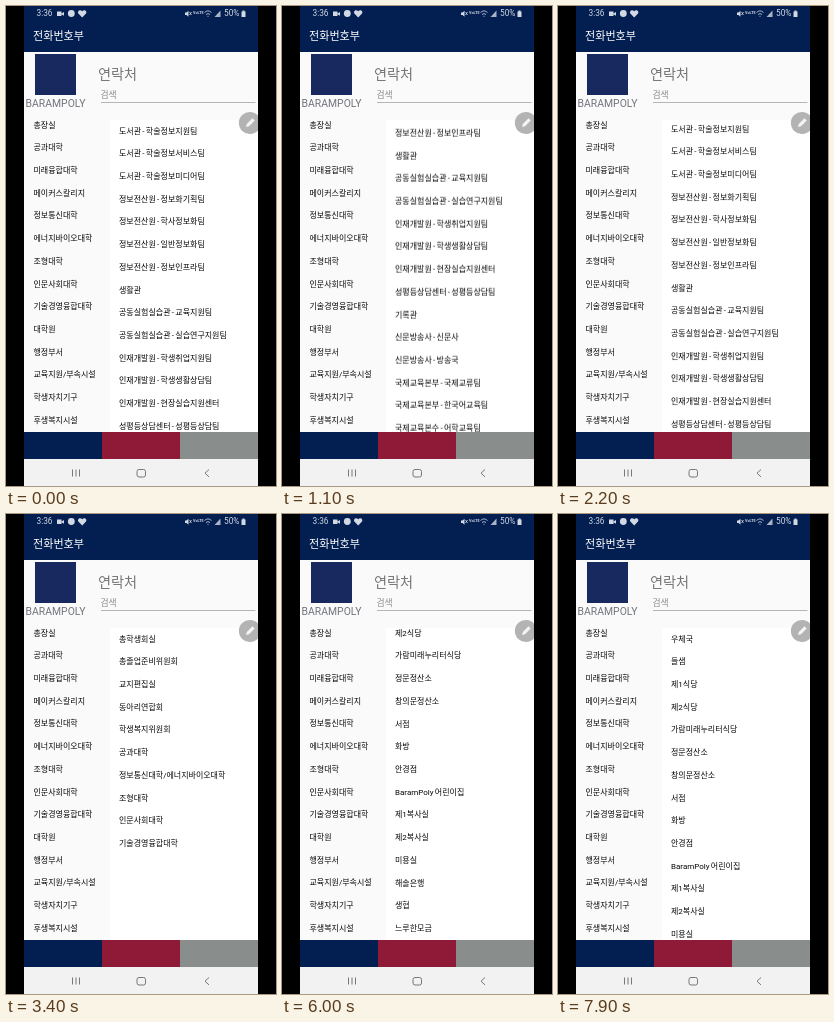
Animation of 270 by 480 pixels, one loop 8000 ms. Source, as an HTML page:

```html
<!DOCTYPE html>
<html lang="ko">
<head>
<meta charset="utf-8">
<title>전화번호부</title>
<style>
  html, body { margin: 0; width: 100%; height: 100%; overflow: hidden; background: #000; }
  body { font: 8px "Noto Sans CJK KR", "Noto Sans CJK", sans-serif; color: #080808; }
  #stage { position: relative; width: 270px; height: 480px; overflow: hidden; background: #000; }
  #screen { position: absolute; left: 18px; width: 234px; height: 480px; background: #fafafa; overflow: hidden; }
  svg { position: absolute; left: 0; top: 0; }
  .label { position: absolute; line-height: 20px; white-space: nowrap; }
  .bar { position: absolute; top: 0; width: 234px; height: 45.5px; background: #031e51; }
  .status { top: -.6px; color: #d3d9e4; font: 8.3px/16px Roboto, sans-serif; }
  .rows { font-family: Roboto, "Noto Sans CJK KR", "Noto Sans CJK", sans-serif; word-spacing: -.7px; }
  .rows div { height: 22.72px; line-height: 22.72px; white-space: nowrap; }
  #groups { position: absolute; left: 9.5px; top: 108.5px; }
  #pane { position: absolute; left: 86px; top: 114px; width: 148px; height: 312px; background: #fff; overflow: hidden; }
  #pane .rows { position: absolute; left: 9px; top: .5px; visibility: hidden; }
  #pane #support { animation: showSupport 8s step-end infinite, scrollSupport 8s linear infinite; }
  #pane #students { animation: showStudents 8s step-end infinite; }
  #pane #welfare { animation: showWelfare 8s step-end infinite, scrollWelfare 8s linear infinite; }
  @keyframes showSupport {
    0% { visibility: visible; }
    31.25%, 100% { visibility: hidden; }
  }
  @keyframes showStudents {
    0% { visibility: hidden; }
    31.25% { visibility: visible; }
    46.25%, 100% { visibility: hidden; }
  }
  @keyframes showWelfare {
    0% { visibility: hidden; }
    46.25%, 100% { visibility: visible; }
  }
  @keyframes scrollSupport {
    0% { transform: translateY(0); animation-timing-function: ease-in-out; }
    10% { transform: translateY(-142.4px); }
    12.5% { transform: translateY(-142.4px); animation-timing-function: ease-in; }
    13.75% { transform: translateY(-134.3px); animation-timing-function: ease-in-out; }
    23.75%, 27.5% { transform: translateY(-2px); }
    28.75%, 100% { transform: translateY(0); }
  }
  @keyframes scrollWelfare {
    0%, 51.25% { transform: translateY(0); animation-timing-function: ease-in; }
    57.5% { transform: translateY(-45.4px); animation-timing-function: ease-out; }
    62.5% { transform: translateY(-74.2px); }
    75% { transform: translateY(-73.6px); animation-timing-function: ease-in-out; }
    78.75%, 100% { transform: translateY(0); }
  }
  .tabs { position: absolute; top: 426px; width: 234px; height: 27px;
    background: linear-gradient(90deg, #031e51 78px, #8f1a38 78px 156px, #898d8c 156px); }
  .nav { position: absolute; top: 453px; width: 234px; height: 27px; background: #f2f2f2; }
</style>
</head>
<body>
<div id="stage">
  <div id="screen">
    <div class="bar"></div>
    <div class="label status" style="left:12.5px">3:36</div>
    <div class="label status" style="left:200px">50%</div>
    <div class="label status" style="left:169px;font-size:3.8px;font-weight:700">VoLTE</div>
    <div class="label" style="left:9px;top:19.3px;font-size:11.1px;font-weight:500;color:#fff">전화번호부</div>
    <div class="label" style="left:74px;top:57.3px;font-size:14.2px;color:#757575">연락처</div>
    <div class="label" style="left:76.5px;top:79px;font-size:8.8px;color:#8a8a8a">검색</div>
    <div class="label" style="left:0;top:87.5px;width:63px;text-align:center;font:10.4px/20px Roboto,sans-serif;color:#70747b">BARAMPOLY</div>
    <div id="groups" class="rows"></div>
    <div id="pane">
      <div id="support" class="rows"></div>
      <div id="students" class="rows"></div>
      <div id="welfare" class="rows"></div>
    </div>
    <div class="tabs"></div>
    <div class="nav"></div>
  </div>
  <svg width="270" height="480" fill="none">
    <g fill="#d3d9e4">
      <path d="M51 5.500h4.500v4.500H51zM55.500 7.500l2.500-1.500v3.800l-2.500-1.500z"/>
      <circle cx="65.3" cy="7.500" r="3.4"/>
      <path d="M76.2 11.500l-3.6-3.700c-2-2.400 1.500-5.200 3.600-2.500 2.100-2.700 5.600.1 3.600 2.500z"/>
      <path d="M179 6.500h1.500l2-1.800v6l-2-1.800H179z"/>
      <path d="M208.500 11l6-6.500v6.500z" fill-opacity=".8"/>
      <path d="M235.500 5.500h1v-1h2v1h1v5.500h-4z"/>
    </g>
    <g stroke="#d3d9e4" stroke-width=".8">
      <path d="M183.500 6l2 3M185.500 6l-2 3M198.500 6.500q3.500-3.200 7 0M200 8.500q2-1.800 4 0M201.500 10.300h1"/>
    </g>
    <rect x="29" y="48" width="41" height="41" fill="#17295f"/>
    <path d="M95 96.500H249.500" stroke="#a5a5a5" stroke-width=".8"/>
    <g stroke="#777" stroke-width="1">
      <path d="M66.500 463.500v7M70 463.500v7M73.500 463.500v7M203 463.500l-4 3.700 4 3.700"/>
      <rect x="131" y="463.500" width="8.500" height="7.500" rx="2"/>
    </g>
    <path d="M252 109.600A11 11 0 1 0 252 124.400z" fill="#b3b3b3"/>
    <path d="M240 121l.8-3 5.700-5.700 2.200 2.200-5.700 5.700z" fill="#f4f4f4"/>
  </svg>
</div>
<script>
  const lists = {
    groups: "총장실,공과대학,미래융합대학,메이커스칼리지,정보통신대학,에너지바이오대학,조형대학,인문사회대학,기술경영융합대학,대학원,행정부서,교육지원/부속시설,학생자치기구,후생복지시설",
    support: "도서관 - 학술정보지원팀,도서관 - 학술정보서비스팀,도서관 - 학술정보미디어팀,정보전산원 - 정보화기획팀,정보전산원 - 학사정보화팀,정보전산원 - 일반정보화팀,정보전산원 - 정보인프라팀,생활관,공동실험실습관 - 교육지원팀,공동실험실습관 - 실습연구지원팀,인재개발원 - 학생취업지원팀,인재개발원 - 학생생활상담팀,인재개발원 - 현장실습지원센터,성평등상담센터 - 성평등상담팀,기록관,신문방송사 - 신문사,신문방송사 - 방송국,국제교육본부 - 국제교류팀,국제교육본부 - 한국어교육팀,국제교육본수 - 어학교육팀",
    students: "총학생회실,총졸업준비위원회,교지편집실,동아리연합회,학생복지위원회,공과대학,정보통신대학/에너지바이오대학,조형대학,인문사회대학,기술경영융합대학",
    welfare: "우체국,들샘,제1식당,제2식당,가람미래누리터식당,정문정산소,창의문정산소,서점,화방,안경점,BaramPoly 어린이집,제1복사실,제2복사실,미용실,해솔은행,생협,느루한모금"
  };
  for (const [id, names] of Object.entries(lists)) {
    const box = document.getElementById(id);
    for (const name of names.split(",")) {
      box.appendChild(document.createElement("div")).textContent = name;
    }
  }
</script>
</body>
</html>
```
